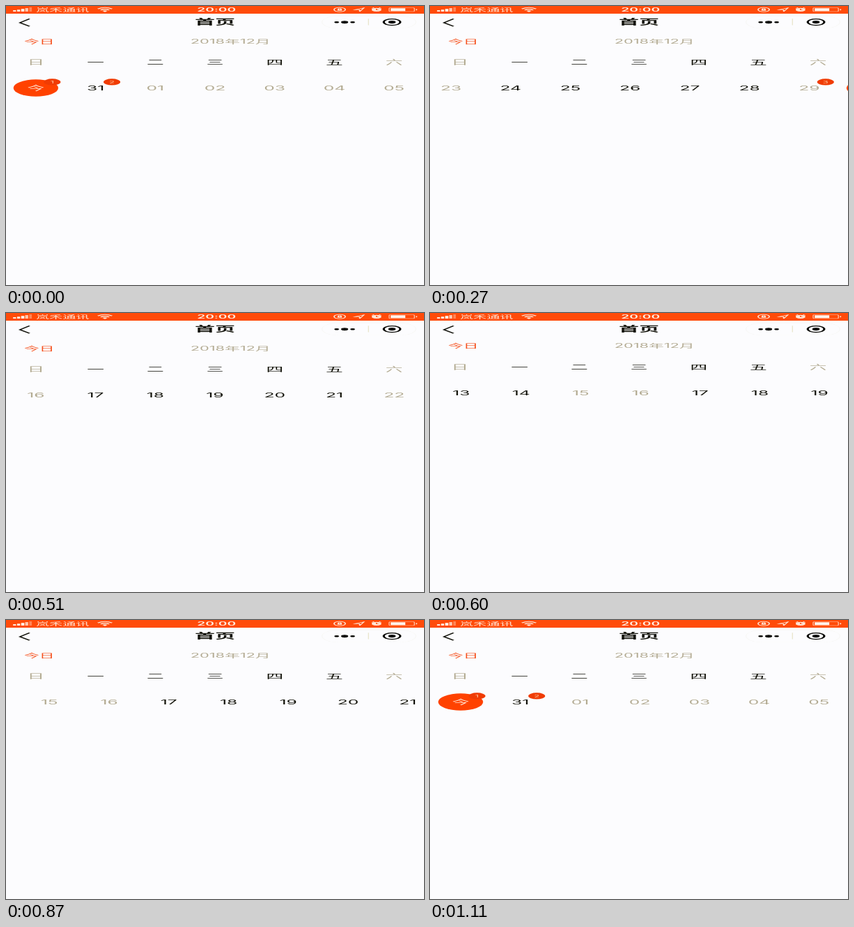
Recreate the animation shown at these times as an HTML page. Size 600 by 400 pixels, loop 1140 ms.

```html
<!DOCTYPE html>
<html lang="zh-CN">
<head>
<meta charset="utf-8">
<title>首页</title>
<style>
  html, body { margin: 0; width: 100%; height: 100%; overflow: hidden; background: #fcfcfe; }
  svg { display: block; width: 100vw; height: 100vh; }
  text {
    font-family: Inter, "Noto Sans CJK SC", "Noto Sans CJK", sans-serif;
    font-size: 17px; text-anchor: middle; fill: #111108;
  }
  .bar text { font-size: 13.2px; fill: #ffe0cf; }
  .bar .time { font-weight: 600; fill: #fff0e6; }
  .title { font-size: 20px; font-weight: 700; }
  .today { font-size: 15px; fill: #f6501c; }
  .month { font-size: 15px; fill: #b3ab92; }
  .off { fill: #b3ab92; }
  .now { fill: #fff0e2; }
  .num { font-size: 9px; fill: #ffc49c; }
  .line { fill: none; stroke: #ffe6d8; stroke-width: 1.2; }
</style>
</head>
<body>
<!-- a 414 x 727 point phone screen squeezed onto the stage -->
<svg viewBox="0 0 414 727" preserveAspectRatio="none">
  <rect width="414" height="727" fill="#fcfcfe"/>
  <g id="page">
    <text class="today" x="33" y="91.8" dy=".37em">今日</text>
    <text class="month" x="222.3" y="91.8" dy=".37em">2018年12月</text>
    <g id="week"></g>
    <g id="strip"></g>
  </g>

  <g class="bar">
    <rect width="414" height="20" fill="#ff4b09"/>
    <g fill="#fff0e6">
      <rect x="7" y="11" width="3" height="3.5"/>
      <rect x="11" y="9.5" width="3" height="5"/>
      <rect x="15" y="7.5" width="3.2" height="7"/>
      <rect x="19" y="5.5" width="3" height="9" opacity=".75"/>
      <rect x="23" y="3.5" width="2.6" height="11" opacity=".35"/>
    </g>
    <text x="56" y="9.5" dy=".37em">岚禾通讯</text>
    <g class="line" stroke-width="1.8">
      <path d="M91 7.5Q98 0.5 105 7.5" stroke-width="2"/>
      <path d="M93.8 10.5Q98 6.3 102.2 10.5" stroke-width="2"/>
      <path d="M96.3 12.6L98 14.8L99.7 12.6Q98 11 96.3 12.6Z" fill="#ffe6d8"/>
    </g>
    <text class="time" x="208.5" y="9.5" dy=".37em">20:00</text>
    <g class="line">
      <circle cx="330.5" cy="9.5" r="5.6"/>
      <rect x="328.3" y="8.8" width="4.4" height="3.4" fill="#ffe6d8" stroke="none"/>
      <path d="M329.2 9V7.6a1.3 1.3 0 0 1 2.6 0V9"/>
      <path d="M345.5 9.8L354.5 5L350.4 14.5L350 10Z"/>
      <circle cx="367" cy="9.8" r="4.2" fill="#ffe6d8"/>
      <path d="M362.3 6.3L364.6 4.2M371.7 6.3L369.4 4.2"/>
      <path d="M367 7.2V10H369" stroke="#ff4b09"/>
      <rect x="379.5" y="4.6" width="25" height="10" rx="2" stroke-width=".9" opacity=".8"/>
      <rect x="381" y="6" width="14.5" height="7.2" fill="#fff5ee" stroke="none"/>
      <path d="M406.6 8V11.2"/>
    </g>
  </g>

  <path d="M23.3 33.5L13.8 43.5L23.3 53" fill="none" stroke="#11110a" stroke-width="2.1"/>
  <text class="title" x="207" y="41.8" dy=".37em">首页</text>
  <rect x="313" y="26" width="93" height="32" rx="16" fill="none" stroke="#f6f6f3" stroke-width=".7"/>
  <path d="M359 33V50" stroke="#e9e5cc" stroke-width=".9"/>
  <g fill="#080804">
    <circle cx="327.5" cy="42.3" r="2.3"/>
    <circle cx="335.4" cy="42.3" r="3.5"/>
    <circle cx="343.3" cy="42.3" r="2.3"/>
    <circle cx="382.3" cy="42" r="3.7"/>
    <circle cx="382.3" cy="42" r="8.2" fill="none" stroke="#080804" stroke-width="2.1"/>
  </g>
</svg>
<script>
  const NS = 'http://www.w3.org/2000/svg';
  const WIDTH = 414, COL = WIDTH / 7, ROW = 213.6;
  const LOOP = 1140, TICK = 30, TODAY = 30;
  const badges = { 29: 3, 30: 1, 31: 2 };
  const page = document.getElementById('page');
  const week = document.getElementById('week');
  const strip = document.getElementById('strip');

  function add(parent, tag, attrs, content = '') {
    const el = document.createElementNS(NS, tag);
    for (const key in attrs) el.setAttribute(key, attrs[key]);
    el.textContent = content;
    parent.append(el);
  }

  function label(parent, x, y, content, cls) {
    add(parent, 'text', { x, y, dy: '.37em', class: cls }, content);
  }

  function disc(x, y, r, fill) {
    add(strip, 'circle', { cx: x, cy: y, r, fill });
  }

  [...'日一二三四五六'].forEach((name, i) =>
    label(week, COL * (i + 0.5), 147.3, name, i % 6 ? '' : 'off'));

  // day numbers run on past December into January
  for (let day = 8; day <= 37; day++) {
    const x = COL * (day - TODAY + 0.5);
    const weekday = (day + 5) % 7;
    const off = day > 31 || weekday === 0 || weekday === 6;
    if (day === TODAY) {
      disc(x, ROW, 22.2, '#ff4200');
      label(strip, x, ROW, '今', 'now');
    } else {
      const date = day > 31 ? day - 31 : day;
      label(strip, x, ROW, String(date).padStart(2, '0'), off ? 'off' : '');
    }
    if (badges[day]) {
      disc(x + 16.2, 198, 8.3, '#f03c04');
      label(strip, x + 16.2, 198, badges[day], 'num');
    }
  }

  // each swipe moves one week: start, duration, direction
  const swipes = [
    [60, 230, 1], [310, 167, 1], [510, 198, 1],
    [760, 150, -1], [915, 163, -1], [995, 118, -1]
  ];
  const clamp = p => Math.min(1, Math.max(0, p));
  const ease = p => p * p * (3 - 2 * p);

  function draw(now) {
    const t = Math.floor((now % LOOP) / TICK) * TICK;
    const weeks = swipes.reduce((sum, [start, length, dir]) =>
      sum + dir * ease(clamp((t - start) / length)), 0);
    const lift = 6.2 * Math.sin(Math.PI * clamp((t - 540) / 120));
    strip.setAttribute('transform', `translate(${weeks * WIDTH} 0)`);
    page.setAttribute('transform', `translate(0 ${-lift})`);
    requestAnimationFrame(draw);
  }
  draw(0);
</script>
</body>
</html>
```
